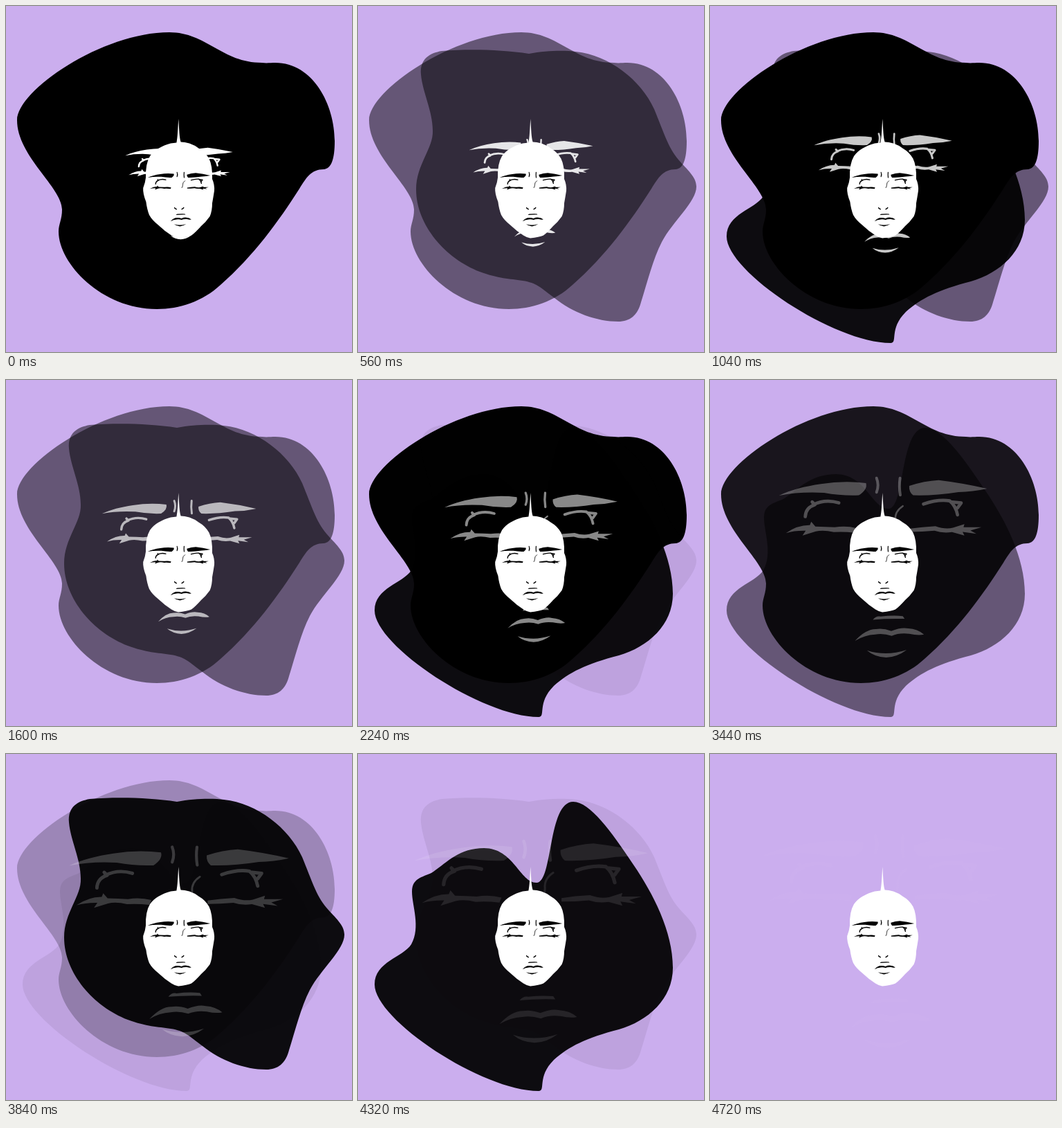
Recreate the animation shown at these times as an HTML page. Size 500 by 500 pixels, loop 4.8 s.

```html
<!DOCTYPE html>
<html lang="en">
<head>
<meta charset="utf-8">
<title>Face and echoes</title>
<style>
html, body { margin: 0; width: 100%; height: 100%; overflow: hidden; background: #cbaeee; }
svg { display: block; width: 100%; height: 100%; }
.line { fill: none; stroke: currentColor; stroke-linecap: round; stroke-linejoin: round; }
.fill { fill: currentColor; }
</style>
</head>
<body>
<svg viewBox="0 0 500 500">
  <defs>
    <g id="features">
      <!-- brows -->
      <path class="fill" d="M204.8 248C210 245.6 216 244 223 243Q233 241.4 242.6 242.6Q243.4 245.4 239.5 247.9Q232 248.2 224.4 246.8Q214 246.2 204.8 248Z"/>
      <path class="fill" d="M261.4 243.8Q268 241.6 274.2 241.3Q285 242.6 295.2 245Q289 246.4 282.8 246.5Q272 248.2 263.1 247.9Q261.2 246.4 261.4 243.8Z"/>
      <!-- frown -->
      <path class="line" stroke-width="1.2" d="M247.2 240.4Q248.4 243.4 247.2 246.6M257.4 240.4Q256.9 244 257.5 247.8"/>
      <path class="line" stroke-width=".8" d="M258.6 252.6Q255 255 255.4 258.6Q255.4 261 254.2 262.6"/>
      <!-- eyes -->
      <path class="line" stroke-width="1.4" d="M216.2 257.2Q216.4 253.2 220.4 252L219.2 250.8M219.6 252Q225 249.4 230.8 251.2"/>
      <path class="fill" d="M207.8 264.3Q213 260.8 218.2 260.9L218.8 259.4L220.6 261.5Q225 261.6 229 261.8Q234 261 238.6 262.2L237.8 264.2Q233 263.6 228.6 263.9Q224 262.8 220.8 263.6L215 265.4L216.4 263.3Q211.6 263.2 207.8 264.3Z"/>
      <path class="line" stroke-width="1.4" d="M267.6 251.7Q274 249.5 279 250.3Q281.6 252.4 282.4 256.4M280 250.8L284 251.2L282.4 253.4"/>
      <path class="fill" d="M261.8 262.4Q267 261.6 272.8 261.3Q277 262.8 280.4 262L285.4 260.4L285 261.8L292.8 261.8L288 263.2L290.6 264.6L284.6 263.8L285.4 265.4L280 263.9Q276 264.5 272.4 263.3Q267 263.8 261.8 263.8Z"/>
      <!-- nose -->
      <path class="line" stroke-width="1.4" d="M243.6 291.6Q244.4 293.2 246.4 293.6M254 293.6Q256 293 256.8 291.4"/>
      <!-- mouth -->
      <path class="fill" d="M245.6 302Q247 300.2 249 300.6Q254 300 258.6 300.4L259.4 301.6Q252 301.4 245.6 302Z"/>
      <path class="fill" d="M237.8 311.2Q242.6 306 247 306.1Q250 305.6 253.6 306.9Q258 305.1 261 305.8Q265 306 267.8 308.4Q265.4 309 261.4 308.1Q257 307.6 253.8 309Q250 307.8 246.6 308.4Q242 308.6 237.8 311.2Z"/>
      <path class="fill" d="M243 315.3Q251.4 318 260.3 315.1Q256 318.3 251.4 318.4Q246.4 318.2 243 315.3Z"/>
    </g>
  </defs>
  <path class="blob" d="M236 38C290 38 312 82 370 82C376 83 383 82 389 82C444 82 475 143 475 195C475 222 470 235 459 236C441 236 434 248 424 264C394 311 358 361 310 403C284 427 251 438 218 438C138 438 76 372 76 326C76 315 81 309 81 294C81 262 16 217 16 165C16 122 139 38 236 38Z"/>
  <path class="blob" d="M91 99C89 76 104 68 121 65C160 62 208 63 247 69C272 64 300 64 315 66C363 71 409 107 428 149C442 183 448 204 463 222C476 237 489 247 489 261C489 283 455 311 439 341C426 366 418 400 409 428C404 447 393 456 376 456C345 456 310 443 284 422C264 407 258 400 238 397C219 394 203 394 176 384C127 365 84 317 84 265C84 229 109 206 108 180C108 152 93 124 91 99Z"/>
  <path class="blob" d="M182 136C225 136 234 186 258 186C282 186 274 69 311 69C335 69 366 112 398 160C426 201 455 256 455 309C455 354 419 386 377 398C330 410 304 423 283 442C258 467 272 487 261 487C180 487 24 384 24 333C24 300 65 294 77 275C91 250 78 219 78 199C78 177 97 178 109 170C129 156 147 136 182 136Z"/>
  <use id="echo" href="#features" color="#fff"/>
  <path fill="#fff" d="M249.2 163C250.4 178 250.4 190 252.6 196.4Q258 196.4 265 198.4Q273 201 279 206Q288 211 293.4 220.6Q298.6 231 298 250Q301.6 258 301 267Q299.6 276 298 285Q298 296 294.6 304Q289 312 282 318Q274 327 268 331.6Q262 334.4 249 335.4Q244 334.6 239 331.4Q229 325 220 316.4Q211 309.4 207 302Q203.8 294 202.4 283Q197.6 271 198.2 263Q201.4 255 202 248Q201.4 228 208 217Q213 210 220 206Q230 200.6 238 198.6L246.4 197.6C248 190 248.4 178 249.2 163Z"/>
  <use href="#features" color="#000"/>
</svg>
<script>
const STEP = 80, STEPS = 60, CYCLE = 13, CYCLES = 4;
const blobs = document.querySelectorAll('.blob');
const echo = document.getElementById('echo');
const start = performance.now();

const clamp = x => Math.min(1, Math.max(0, x));
const ease = x => (1 - Math.cos(Math.PI * clamp(x))) / 2;
const pulse = (p, from) => ease((p - from) / 6) - ease((p - from - 6) / 6);

// opacity of each blob at step p of a cycle
const fades = [
  p => p < 0 ? 0 : 1 - ease((p - 1.5) / 11),
  p => pulse(p, 4),
  p => pulse(p, 8)
];

function draw(n) {
  blobs.forEach((blob, i) => {
    let alpha = 0;
    for (let k = 0; k < CYCLES; k++) alpha += fades[i](n - k * CYCLE);
    blob.setAttribute('opacity', clamp(alpha));
  });
  const scale = 1.72 + n * 0.0373;
  echo.setAttribute('transform', `translate(250 269) scale(${scale}) translate(-250 -278.7)`);
  echo.setAttribute('opacity', 1 - n / STEPS);
}

function tick() {
  const t = performance.now() - start;
  draw(Math.floor(t / STEP) % STEPS);
  requestAnimationFrame(tick);
}
tick();
</script>
</body>
</html>
```
